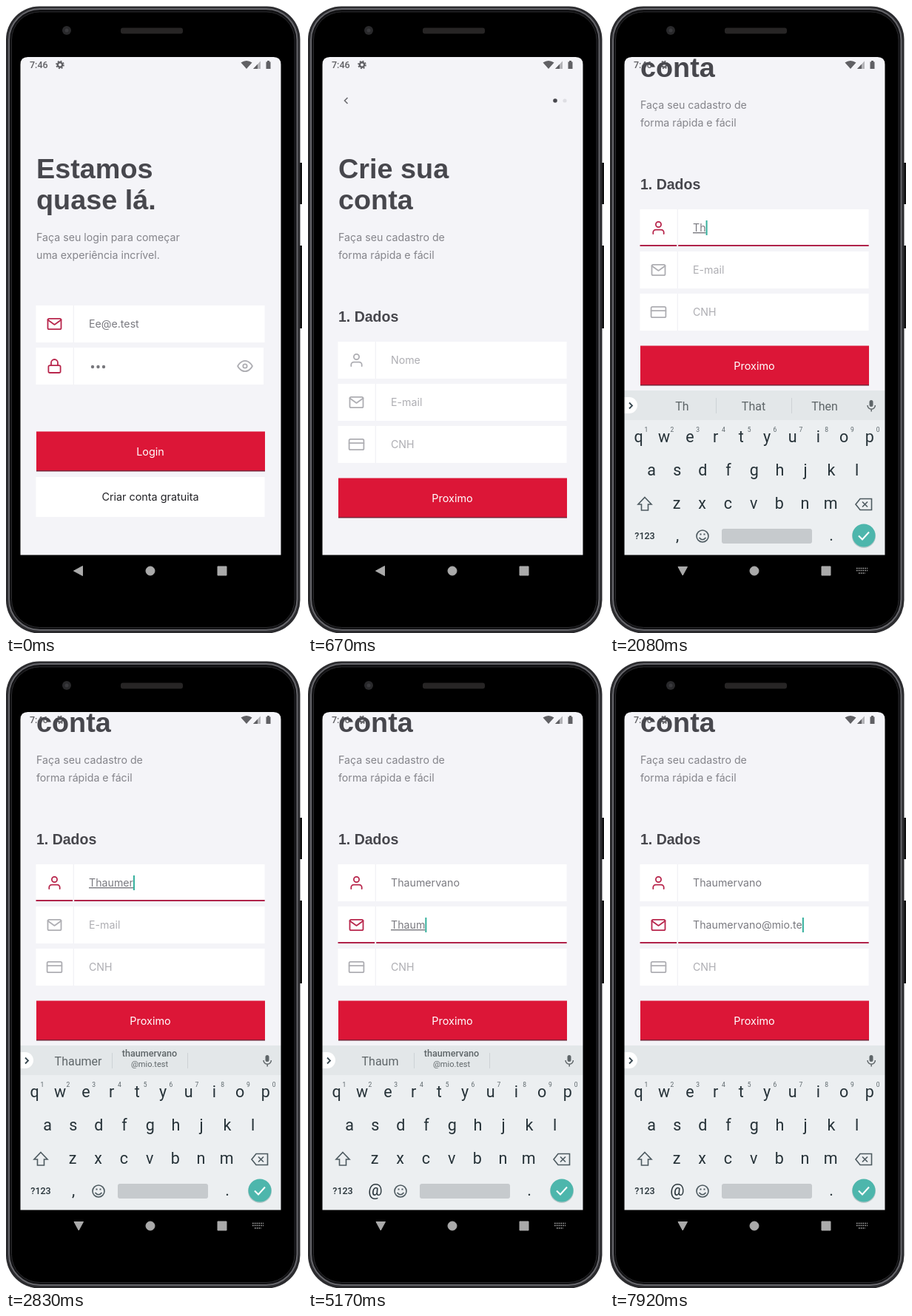
Write an HTML page that moves like this. It is 400 px wide and 848 px high and loops after 8000 ms.

```html
<!DOCTYPE html>
<html lang="pt">
<head>
<meta charset="utf-8">
<style>
  html, body { margin: 0; width: 100%; height: 100%; overflow: hidden; background: #fff; }
  svg { display: block; width: 400px; height: 848px; }
  text { font: 14.2px Inter, sans-serif; }
  .title { font: bold 37.8px "Liberation Sans", Arial, sans-serif; fill: #47474d; }
  .section { font: bold 19.5px "Liberation Sans", Arial, sans-serif; fill: #47474d; }
  .sub { fill: #84848a; }
  .hint { fill: #aeaeb3; }
  .typed { fill: #7a7a80; }
  .btn { font-size: 14.4px; text-anchor: middle; }
  .icon { fill: none; stroke: #aeaeb3; stroke-width: 2; stroke-linecap: round; stroke-linejoin: round; }
  .icon.red { stroke: #b8264c; }
  .key { font: 21.5px Roboto, sans-serif; fill: #263238; text-anchor: middle; }
  .digit { font: 8.5px Roboto, sans-serif; fill: #5c666b; text-anchor: middle; }
  .word { font: 16px Roboto, sans-serif; fill: #5f6669; text-anchor: middle; }
  #status { fill: #606064; mix-blend-mode: darken; }
</style>
</head>
<body>
<svg viewBox="0 0 400 848">
  <defs>
    <clipPath id="display"><path d="M19.5 742.500V79q0-10 10-10H361.500q10 0 10 10V742.500Z"/></clipPath>
  </defs>

  <path d="M393 212h7v56h-7zM393 324h7v112h-7z" fill="#111"/>
  <rect y="0.5" width="397.5" height="848" rx="45" fill="#2b2b2e"/>
  <rect x="4" y="4" width="389.5" height="840" rx="42" fill="#111113" stroke="#66666b" stroke-width="2"/>
  <rect x="7.500" y="8" width="382.5" height="832.5" rx="38" fill="#000" stroke="#29292c"/>
  <circle cx="82" cy="33" r="6" fill="#29292b"/>
  <circle cx="82" cy="33" r="2.5" fill="#3a3a3d"/>
  <rect x="155" y="29.5" width="84" height="8" rx="3" fill="#272525"/>

  <g clip-path="url(#display)">
    <rect x="19" y="69" width="353" height="674" fill="#f4f4f8"/>
    <g id="login"></g>
    <g id="signup">
      <rect x="19" y="69" width="353" height="674" fill="#f4f4f8"/>
      <g id="form"></g>
    </g>
    <g id="keyboard"></g>
    <g id="status">
      <text x="32" y="84" style="font:500 12.5px Roboto,sans-serif">7:46</text>
      <g fill="none" stroke="#606064">
        <circle cx="73" cy="79.5" r="3.2" stroke-width="2.4"/>
        <circle cx="73" cy="79.5" r="4.9" stroke-width="1.8" stroke-dasharray="1.92"/>
      </g>
      <path d="M317.5 76.5q7.500-5 15 0L325 85Z"/>
      <path d="M334 85h10V74.500Z" fill="#b4b4b8"/>
      <path d="M334 85h6v-6.300Z"/>
      <path d="M351.500 75.500h1.500v-1.500h3v1.500h1.500V85h-6Z"/>
    </g>
  </g>

  <g fill="#aaa" stroke="#aaa" stroke-linejoin="round">
    <path id="back"/>
    <circle cx="195" cy="764" r="6"/>
    <rect x="286" y="758" width="12" height="12"/>
    <g id="switcher" fill="none" stroke-width="1.600" stroke-dasharray="1.6 1.200">
      <path d="M333 760.500h15M333 763.500h15M336 767h9"/>
    </g>
  </g>
</svg>
<script>
const $ = id => document.getElementById(id);
const LOOP = 8000, SCROLL = 179, KEYBOARD_HEIGHT = 222;
const NAME = 'Thaumervano', EMAIL = NAME + '@mio.te', DOMAIN = '@mio.test';
const EMAIL_FOCUS = 4170;

const icons = {
  mail: '<rect x="2" y="4" width="20" height="16" rx="2"/><path d="M22 6l-10 7L2 6"/>',
  lock: '<rect x="3" y="11" width="18" height="11" rx="2"/><path d="M7 11V7a5 5 0 0 1 10 0v4"/>',
  eye: '<path d="M1 12s4-8 11-8 11 8 11 8-4 8-11 8S1 12 1 12z"/><circle cx="12" cy="12" r="3"/>',
  user: '<path d="M20 21v-2a4 4 0 0 0-4-4H8a4 4 0 0 0-4 4v2"/><circle cx="12" cy="7" r="4"/>',
  card: '<rect x="1" y="4" width="22" height="16" rx="2"/><path d="M1 10h22"/>'
};

const text = (x, y, cls, str, attrs = '') => `<text x="${x}" y="${y}" class="${cls}" ${attrs}>${str}</text>`;
const icon = (name, x, y, cls = '', attrs = '') =>
  `<g class="icon ${cls}" ${attrs} transform="translate(${x} ${y}) scale(.9) translate(-12 -12)">${icons[name]}</g>`;
const box = (y, h, fill, x = 40.5, w = 309) => `<rect x="${x}" y="${y}" width="${w}" height="${h}" fill="${fill}"/>`;
const button = (y, label) =>
  box(y, 53, '#dc1637', 41) + box(y + 52.5, 1.5, '#7b2238', 41) + text(195, y + 32, 'btn', label, 'fill="#fff"');
const field = (y, w = 309) => box(y, 50, '#fff', 40.5, w) + box(y, 50, '#f1f1f5', 90.7, 1.3);

// Login screen
$('login').innerHTML =
  text(41, 233, 'title', 'Estamos') + text(41, 275, 'title', 'quase lá.') +
  text(41, 318, 'sub', 'Faça seu login para começar') +
  text(41, 342, 'sub', 'uma experiência incrível.') +
  field(405) + icon('mail', 65.5, 430, 'red') + text(112, 435, 'typed', 'Ee@e.test') +
  field(462, 307.5) + icon('lock', 65.5, 487, 'red') + icon('eye', 323, 487) +
  [117, 124.5, 132].map(x => `<circle cx="${x}" cy="488" r="2.2" fill="#77777c"/>`).join('') +
  button(575.5, 'Login') + box(637, 54, '#fff') +
  text(195, 669, 'btn', 'Criar conta gratuita', 'fill="#222226"');

// Sign-up form
const inputs = [['user', 'Nome'], ['mail', 'E-mail'], ['card', 'CNH']];
$('form').innerHTML =
  '<path d="M53.500 124l-4 4 4 4" fill="none" stroke="#6b6b70" stroke-width="1.600"/>' +
  '<circle cx="334" cy="128" r="2.800" fill="#47474d"/><circle cx="347" cy="128" r="2.600" fill="#dedee3"/>' +
  text(41, 233, 'title', 'Crie sua') + text(41, 275, 'title', 'conta') +
  text(41, 318, 'sub', 'Faça seu cadastro de') + text(41, 342, 'sub', 'forma rápida e fácil') +
  text(41, 427, 'section', '1. Dados') +
  inputs.map(([name, hint], i) => {
    const y = 454 + 57 * i;
    return field(y) + icon(name, 65.5, y + 25, '', `id="icon${i}"`) +
      text(112, y + 30, 'hint', hint, `id="input${i}"`) +
      `<path id="line${i}" d="M40.500 ${y + 49}h49.700m2 0h257.500" stroke="#b0234a" stroke-width="2"/>`;
  }).join('') +
  button(638.5, 'Proximo') +
  '<rect id="cursor" width="2" height="20" fill="#35b09c"/>';

// Keyboard
const row = (letters, x, y) => [...letters].map((c, i) => text(x + 34.7 * i, y, 'key', c)).join('');
$('keyboard').innerHTML =
  box(520, 223, '#eceff1', 19, 353) + box(520, 40, '#e3e7e9', 19, 353) +
  '<rect x="8" y="529" width="29" height="22" rx="11" fill="#fff"/>' +
  '<path d="M26 536.500l4 4-4 4" fill="none" stroke="#37474f" stroke-width="1.800"/>' +
  '<path id="dividers" d="M143.500 530v21M245.500 530v21" stroke="#cdd2d5"/>' +
  [97.5, 194, 290].map((x, i) => text(x, 547, 'word', '', `id="word${i}"`)).join('') +
  `<g id="address">${text(194, 535, 'word', NAME.toLowerCase(), 'style="font-size:12.6px;font-weight:500"')}` +
  `${text(194, 549, 'word', DOMAIN, 'style="font-size:11px"')}</g>` +
  '<rect x="350.500" y="533" width="5" height="9" rx="2.500" fill="#5f6669"/>' +
  '<path d="M348 540a5.200 5.200 0 0 0 10.400 0M353.200 545v3.500" fill="none" stroke="#5f6669" stroke-width="1.500"/>' +
  row('qwertyuiop', 38.5, 590) + row('asdfghjkl', 56, 635) + row('zxcvbnm', 90, 680) +
  [...'1234567890'].map((d, i) => text(49 + 34.8 * i, 576, 'digit', d)).join('') +
  '<g fill="none" stroke="#4d5a60" stroke-width="1.600">' +
  '<path d="M47 664.500l9 9.500h-4.500v8h-9v-8H38Z"/>' +
  '<path d="M338 666.500h15.500v15H338l-6-7.500ZM341 670.500l7 7m0-7l-7 7"/>' +
  '<circle cx="125" cy="717" r="8"/><path d="M120.500 719q4.500 5.500 9 0"/></g>' +
  '<path d="M121.500 713.500h2v2h-2zM126.500 713.500h2v2h-2z" fill="#4d5a60"/>' +
  text(47, 721, 'key', '?123', 'style="font-size:12.5px;font-weight:500"') +
  text(91, 723, 'key', ',', 'id="symbol"') + text(299, 723, 'key', '.') +
  '<rect x="151" y="707" width="122" height="20" rx="3" fill="#c6cacd"/>' +
  '<circle cx="343" cy="717" r="16" fill="#b9c9ca"/><circle cx="343" cy="716" r="15.500" fill="#4db6ac"/>' +
  '<path d="M336 716.500l5 5 9-10" fill="none" stroke="#fff" stroke-width="2"/>';

// Typing: the moment each character appears
const nameTimes = [...NAME].map((_, i) => i < 2 ? 1850 + 160 * i : 2330 + 110 * (i - 2));
const emailTimes = [...NAME].map((_, i) => 4680 + 115 * i).concat(6150, 6330, 6950, 7120, 7300, 7560, 7830);
const COMMA_ON = 6450, COMMA_OFF = 6700;
const countPast = (times, t) => times.filter(s => s <= t).length;

const ease = (t, start, duration) => {
  const p = Math.min(1, Math.max(0, (t - start) / duration));
  return 1 - (1 - p) ** 3;
};
const show = (id, on) => $(id).style.display = on ? '' : 'none';

function setInput(i, value, focused, composing) {
  const el = $('input' + i);
  el.textContent = value || inputs[i][1];
  el.setAttribute('class', value ? 'typed' : 'hint');
  el.setAttribute('text-decoration', value && composing ? 'underline' : 'none');
  $('icon' + i).setAttribute('class', value || focused ? 'icon red' : 'icon');
  show('line' + i, focused);
}

function setSuggestions(word, onEmail) {
  const visible = word && !word.includes('@');
  const withAddress = visible && (onEmail || word.length > 2);
  const words = !visible ? ['', '', ''] : withAddress ? [word, '', ''] : [word, 'That', 'Then'];
  words.forEach((w, i) => $('word' + i).textContent = w);
  $('word0').style.fontSize = word.length > 9 ? '14.4px' : '16px';
  show('address', withAddress);
  show('dividers', visible);
}

function render(t) {
  const enter = ease(t, 160, 380);
  const scale = .9 + .1 * enter;
  $('signup').setAttribute('opacity', enter);
  $('signup').setAttribute('transform', `translate(195 405) scale(${scale}) translate(-195 -405)`);

  const keyboard = ease(t, 1250, 280);
  $('keyboard').setAttribute('transform', `translate(0 ${KEYBOARD_HEIGHT * (1 - keyboard)})`);
  show('keyboard', keyboard > 0);
  show('switcher', keyboard > 0);
  $('back').setAttribute('d', keyboard > 0 ? 'M92 758.500h12.500l-6.250 11.500Z' : 'M91.500 764l12-6.500v13Z');
  $('form').setAttribute('transform', `translate(0 ${-SCROLL * ease(t, 1350, 320)})`);

  const onEmail = t >= EMAIL_FOCUS, focused = t >= 1080;
  const name = NAME.slice(0, countPast(nameTimes, t));
  const comma = t >= COMMA_ON && t < COMMA_OFF ? ',' : '';
  const email = EMAIL.slice(0, countPast(emailTimes, t)) + comma;
  setInput(0, name, focused && !onEmail, !onEmail);
  setInput(1, email, onEmail, !email.includes('@'));
  setInput(2, '', false, false);
  setSuggestions(onEmail ? email : name, onEmail);
  $('symbol').textContent = onEmail ? '@' : ',';

  // The cursor blinks every half second, restarting on each edit
  const edits = [1080, EMAIL_FOCUS, COMMA_ON, COMMA_OFF, ...nameTimes, ...emailTimes];
  const lastEdit = Math.max(...edits.filter(s => s <= t));
  const active = onEmail ? 1 : 0;
  const width = (onEmail ? email : name) ? $('input' + active).getComputedTextLength() : 0;
  $('cursor').setAttribute('x', 112 + width);
  $('cursor').setAttribute('y', 469 + 57 * active);
  show('cursor', focused && (t - lastEdit) % 1000 < 500);
}

const start = performance.now();
function tick() {
  render((performance.now() - start) % LOOP);
  requestAnimationFrame(tick);
}
tick();
</script>
</body>
</html>
```
